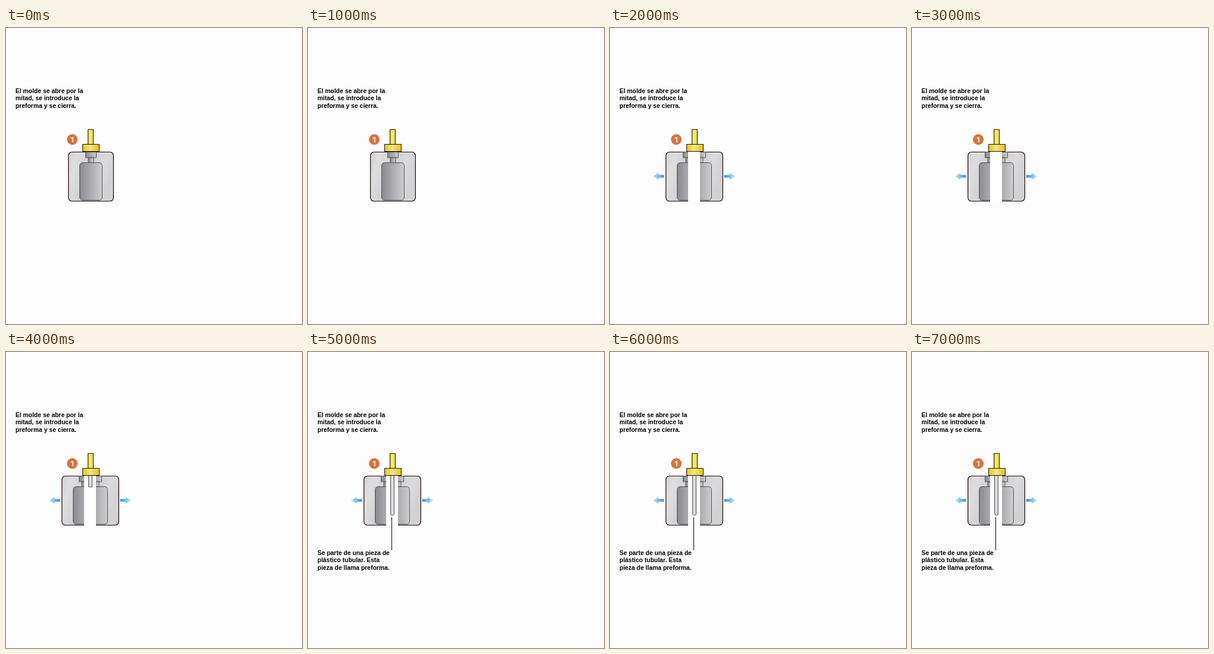
An HTML page for the animation above (8 s loop, 500 by 500 pixels).

```html
<!DOCTYPE html>
<html lang="es">
<head>
<meta charset="utf-8">
<title>Moldeo por soplado</title>
<style>
  html, body { margin: 0; width: 100%; height: 100%; overflow: hidden; background: #fdfdfd; }
  svg { display: block; width: 100%; height: 100%; }
  text { font: bold 10.45px "Liberation Sans", Arial, sans-serif; fill: #000; }
  .badge { font: bold 13px Roboto, sans-serif; fill: #fff; }
</style>
</head>
<body>
<svg viewBox="0 0 500 500">
  <defs>
    <linearGradient id="block" x1="0" y1="0" x2="1" y2="0.3">
      <stop offset="0" stop-color="#d2d2d5"/>
      <stop offset="0.2" stop-color="#dededf"/>
      <stop offset="0.5" stop-color="#d0d0d3"/>
      <stop offset="0.8" stop-color="#dadadc"/>
      <stop offset="1" stop-color="#d2d2d5"/>
    </linearGradient>
    <linearGradient id="cavity">
      <stop offset="0" stop-color="#8a8a8e"/>
      <stop offset="0.5" stop-color="#acacb0"/>
      <stop offset="1" stop-color="#cecece"/>
    </linearGradient>
    <linearGradient id="rod">
      <stop offset="0" stop-color="#e0d03c"/>
      <stop offset="0.5" stop-color="#f2ea84"/>
      <stop offset="1" stop-color="#e0d03c"/>
    </linearGradient>
    <linearGradient id="collar">
      <stop offset="0" stop-color="#e6c41c"/>
      <stop offset="0.45" stop-color="#f3e784"/>
      <stop offset="1" stop-color="#e6c01c"/>
    </linearGradient>
    <linearGradient id="tube">
      <stop offset="0" stop-color="#c8c8ca"/>
      <stop offset="0.5" stop-color="#e4e4e4"/>
      <stop offset="1" stop-color="#c8c8ca"/>
    </linearGradient>
    <linearGradient id="blue">
      <stop offset="0" stop-color="#3a94cc"/>
      <stop offset="0.5" stop-color="#6cbde2"/>
      <stop offset="1" stop-color="#d4eef6"/>
    </linearGradient>
    <clipPath id="clipL"><rect x="100" y="200" width="43" height="100"/></clipPath>
    <clipPath id="clipR"><rect x="143" y="200" width="45" height="100"/></clipPath>
    <g id="mold">
      <rect x="105.5" y="209.5" width="76" height="83" rx="6" fill="url(#block)" stroke="#1e0408" stroke-width="1.2"/>
      <g fill="url(#cavity)" stroke="#444446" stroke-width="0.9">
        <rect x="134.5" y="209.5" width="18" height="9.5"/>
        <rect x="139" y="219" width="9" height="8.5"/>
        <rect x="124.5" y="227.5" width="38" height="63.5" rx="5"/>
      </g>
    </g>
    <path id="arrow" d="M0 -2.2H9.5V-5L17.5 0L9.5 5V2.2H0Z" fill="url(#blue)" stroke="#78b4cc" stroke-width="0.5"/>
  </defs>

  <rect width="500" height="500" fill="#fdfdfd"/>
  <text x="16" y="110">El molde se abre por la</text>
  <text x="16" y="122.4">mitad, se introduce la</text>
  <text x="16" y="134.8">preforma y se cierra.</text>

  <circle cx="112" cy="188.3" r="9" fill="#d8743c"/>
  <text class="badge" x="112.3" y="193" text-anchor="middle">1</text>

  <rect id="gap" x="132" y="209" width="20" height="84" fill="#fff"/>
  <g id="left"><g clip-path="url(#clipL)"><use href="#mold"/></g></g>
  <g id="right"><g clip-path="url(#clipR)"><use href="#mold"/></g></g>
  <g id="arrows">
    <use href="#arrow" transform="translate(91 250.5) scale(-1 1)"/>
    <use href="#arrow" transform="translate(193 250.5)"/>
  </g>
  <path id="preform" fill="url(#tube)" stroke="#444446" stroke-width="0.9"/>

  <rect x="138.5" y="171.5" width="9" height="25" fill="url(#rod)" stroke="#1c1600"/>
  <rect x="129.5" y="196.5" width="28" height="12" fill="url(#collar)" stroke="#1c1600"/>

  <g id="note">
    <path d="M141.5 279V335" stroke="#000"/>
    <text x="16" y="343">Se parte de una pieza de</text>
    <text x="16" y="355.4">plástico tubular. Esta</text>
    <text x="16" y="367.8">pieza de llama preforma.</text>
  </g>
</svg>
<script>
  const LOOP = 8000, OPEN = 2000, INSERT = 4000, FULL = 5000;
  const $ = id => document.getElementById(id);
  const show = (id, on) => $(id).setAttribute('visibility', on ? 'visible' : 'hidden');
  const shift = (id, x) => $(id).setAttribute('transform', `translate(${x} 0)`);

  // The tube is cut flat while emerging, rounded once fully lowered.
  const tubePath = full => full
    ? 'M139.5 208.5V273Q139.5 276 142.5 276Q145.5 276 145.5 273V208.5Z'
    : 'M139.5 208.5V228H145.5V208.5Z';

  function draw(t) {
    const open = t >= OPEN, full = t >= FULL;
    shift('left', open ? -11 : 0);
    shift('right', open ? 9 : 0);
    show('gap', open);
    show('arrows', open);
    show('preform', t >= INSERT);
    $('preform').setAttribute('d', tubePath(full));
    show('note', full);
  }

  const start = performance.now();
  function tick() {
    draw((performance.now() - start) % LOOP);
    requestAnimationFrame(tick);
  }
  tick();
</script>
</body>
</html>
```
